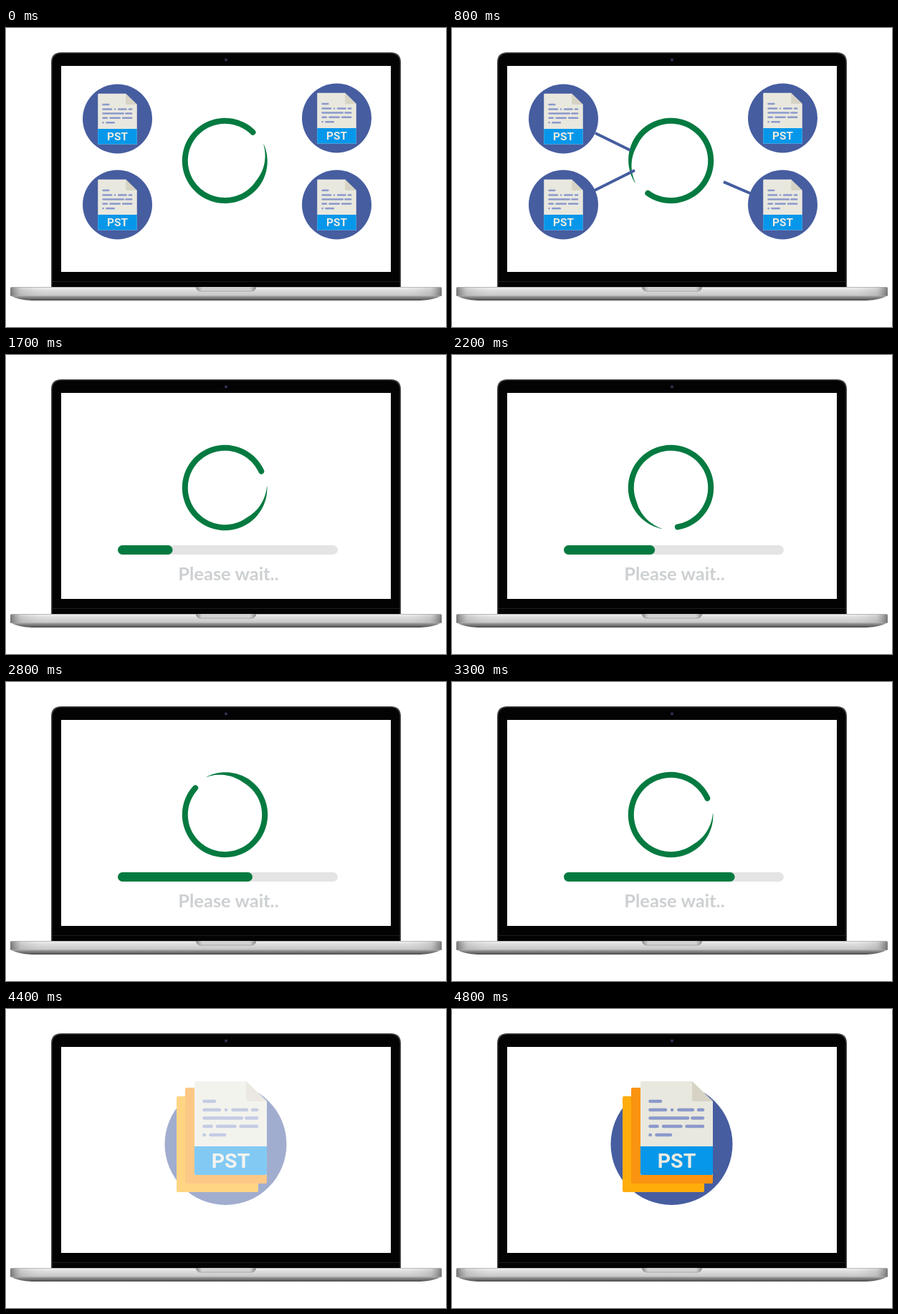
These frames come from a looping animation (614 px wide and 418 px high, 5500 ms). An HTML page:

```html
<!DOCTYPE html>
<html lang="en">
<head>
<meta charset="utf-8">
<title>Merging files</title>
<style>
  html, body { margin: 0; width: 100%; height: 100%; overflow: hidden; background: #fff; }
  svg { display: block; width: 614px; height: 418px; }
  .label { font: 700 28.5px Roboto, sans-serif; fill: #ecebe2; text-anchor: middle; }
  .wait { font: 700 25.5px Lato, sans-serif; fill: #cdd0d2; text-anchor: middle; }
  .rows { fill: none; stroke: #8b99cb; stroke-width: 4.6; stroke-linecap: round; }
  .links { stroke: #455d9f; stroke-width: 4; }
</style>
</head>
<body>
<svg viewBox="0 0 614 418">
  <defs>
    <linearGradient id="deck" x2="0" y2="1">
      <stop offset="0" stop-color="#f4f4f4"/>
      <stop offset=".35" stop-color="#dedede"/>
      <stop offset="1" stop-color="#c4c4c4"/>
    </linearGradient>
    <linearGradient id="side">
      <stop offset="0" stop-color="#555" stop-opacity=".75"/>
      <stop offset=".025" stop-color="#888" stop-opacity=".25"/>
      <stop offset=".1" stop-color="#fff" stop-opacity="0"/>
      <stop offset=".9" stop-color="#fff" stop-opacity="0"/>
      <stop offset=".975" stop-color="#888" stop-opacity=".25"/>
      <stop offset="1" stop-color="#555" stop-opacity=".75"/>
    </linearGradient>
    <linearGradient id="under" x2="0" y2="1">
      <stop offset="0" stop-color="#aaa"/>
      <stop offset="1" stop-color="#4a4a4a"/>
    </linearGradient>
    <linearGradient id="notch">
      <stop offset="0" stop-color="#888"/>
      <stop offset=".1" stop-color="#d2d2d2"/>
      <stop offset=".9" stop-color="#d2d2d2"/>
      <stop offset="1" stop-color="#888"/>
    </linearGradient>
    <g id="doc">
      <path d="M265 101H335L364 129V232H263V103Q263 101 265 101Z" fill="#e9e8df"/>
      <path d="M335 101L364 129H338Q335 129 335 126Z" fill="#d6d3c4"/>
      <path d="M263 192H364V230Q364 232 362 232H265Q263 232 263 230Z" fill="#0797ea"/>
      <path class="rows" d="M276.5 129H291M276.5 141H298M307 141h.1M316.5 141H336M344 141H350
        M276.5 152.5H329M335.5 152.5H350M276.5 164H286.5M295 164H319.5M327.5 164H350
        M276.5 176h.3M285.5 176H305"/>
      <text class="label" x="313.5" y="222">PST</text>
    </g>
  </defs>

  <path d="M63 362V48Q63 34 77 34H537Q551 34 551 48V362Z" fill="#444"/>
  <path d="M64.5 362V49Q64.5 35.5 78 35.5H536Q549.5 35.5 549.5 49V362Z" fill="#030303"/>
  <path d="M65 354.5H549" stroke="#1c1c1c"/>
  <rect x="77" y="53" width="460" height="288" fill="#fff"/>
  <circle cx="307" cy="44.5" r="2.4" fill="#1b1b2c"/>
  <circle cx="307" cy="44.5" r="1.1" fill="#4b4f86"/>

  <path d="M6 374H608Q598 380 578 381H36Q16 380 6 374Z" fill="url(#under)"/>
  <path d="M8 362H606Q608 362 608 364V374.5H6V364Q6 362 8 362Z" fill="url(#deck)"/>
  <path d="M8 362H606Q608 362 608 364V374.5H6V364Q6 362 8 362Z" fill="url(#side)"/>
  <path d="M7 362.5H607" stroke="#aaa" stroke-width=".8"/>
  <path d="M265 362H349Q348 368 342 368H272Q266 368 265 362Z" fill="url(#notch)"/>
  <path d="M265 362Q266 368 272 368H342Q348 368 349 362" fill="none" stroke="#999" stroke-width=".8"/>

  <path id="ring" fill="#047a40"/>
  <g id="files"><g class="links" id="links"></g></g>
  <g id="progress">
    <rect x="156" y="266" width="307" height="13" rx="6.5" fill="#e4e4e4"/>
    <rect id="fill" x="156" y="266" height="13" rx="6.5" fill="#047a40"/>
  </g>
  <text id="wait" class="wait" x="310.5" y="315">Please wait..</text>
  <g id="result">
    <circle cx="306.5" cy="189" r="85" fill="#465da0"/>
    <path d="M240 122H300V244H352V254Q352 256 350 256H240Q238 256 238 254V124Q238 122 240 122Z" fill="#ffad0b"/>
    <path d="M252 110H300V232H364V242Q364 244 362 244H252Q250 244 250 242V112Q250 110 252 110Z" fill="#fa9310"/>
    <use href="#doc"/>
  </g>
</svg>
<script>
  const LOOP = 5500, STEP = 100;
  const LINK_STEPS = 3;
  const TEXT_AT = 12, BAR_AT = 13, RESULT_AT = 42;

  const $ = id => document.getElementById(id);
  const show = (id, on) => $(id).setAttribute('visibility', on ? 'visible' : 'hidden');
  const make = (parent, tag, attrs) => {
    const el = document.createElementNS('http://www.w3.org/2000/svg', tag);
    for (const name in attrs) el.setAttribute(name, attrs[name]);
    return parent.appendChild(el);
  };

  // Start and end of each connector, in drawing order
  const links = [
    [200, 147, 249, 171],
    [199, 227, 255, 199],
    [417, 231.5, 360, 207],
    [414, 147, 361, 172]
  ].map(ends => ({ ends, el: make($('links'), 'line', {}) }));

  for (const [x, y] of [[155.5, 127], [461.5, 126], [155.5, 247], [461.5, 247]]) {
    make($('files'), 'circle', { cx: x, cy: y, r: 48.5, fill: '#465da0' });
    make($('files'), 'use', {
      href: '#doc',
      transform: `translate(${x - 313.5 * .54} ${y - 35.2 - 101 * .54}) scale(.54)`
    });
  }

  // Clock angle in degrees to a point around the ring centre
  function polar(deg, r) {
    const a = deg * Math.PI / 180;
    return (305.5 + r * Math.sin(a)).toFixed(2) + ' ' + (185.5 - r * Math.cos(a)).toFixed(2);
  }

  // Ring with a round head and a tail that thins towards the outer edge
  function ringPath(head) {
    const outer = 59.7, inner = 51.7, span = 337.5, taper = 55;
    const tail = head - span;
    const out = [], back = [];
    for (let i = 0; i <= 90; i++) {
      const d = span * i / 90;
      const grow = Math.min(1, d / taper);
      out.push(polar(tail + d, outer - .8 * (1 - grow)));
      back.unshift(polar(tail + d, outer - 1.2 - (outer - 1.2 - inner) * grow));
    }
    return `M${out.join('L')}A4 4 0 0 1 ${back.join('L')}Z`;
  }

  function headAngle(k) {
    const p = 45 + 22.5 * k;
    return p - 5 + 5 * Math.cos((p - 20) * Math.PI / 180);
  }

  function draw(ms) {
    const k = Math.floor(ms / STEP);
    const done = k >= RESULT_AT;

    show('ring', !done);
    show('files', k < BAR_AT);
    show('wait', k >= TEXT_AT && !done);
    show('progress', k >= BAR_AT && !done);
    show('result', done);

    $('ring').setAttribute('d', ringPath(headAngle(k)));
    $('fill').setAttribute('width', Math.max(0, Math.min(308, 36 + 10.13 * (k - BAR_AT))));
    $('result').setAttribute('opacity', Math.max(0, Math.min(1, (Math.floor((k - RESULT_AT) / 2) + 1) / 4)));

    links.forEach(({ ends: [x1, y1, x2, y2], el }, i) => {
      const p = Math.max(0, Math.min(1, (k - i * LINK_STEPS) / LINK_STEPS));
      const at = { x1, y1, x2: x1 + (x2 - x1) * p, y2: y1 + (y2 - y1) * p };
      for (const name in at) el.setAttribute(name, at[name]);
    });
  }

  const start = performance.now();
  function tick() {
    draw((performance.now() - start) % LOOP);
    requestAnimationFrame(tick);
  }
  tick();
</script>
</body>
</html>
```
